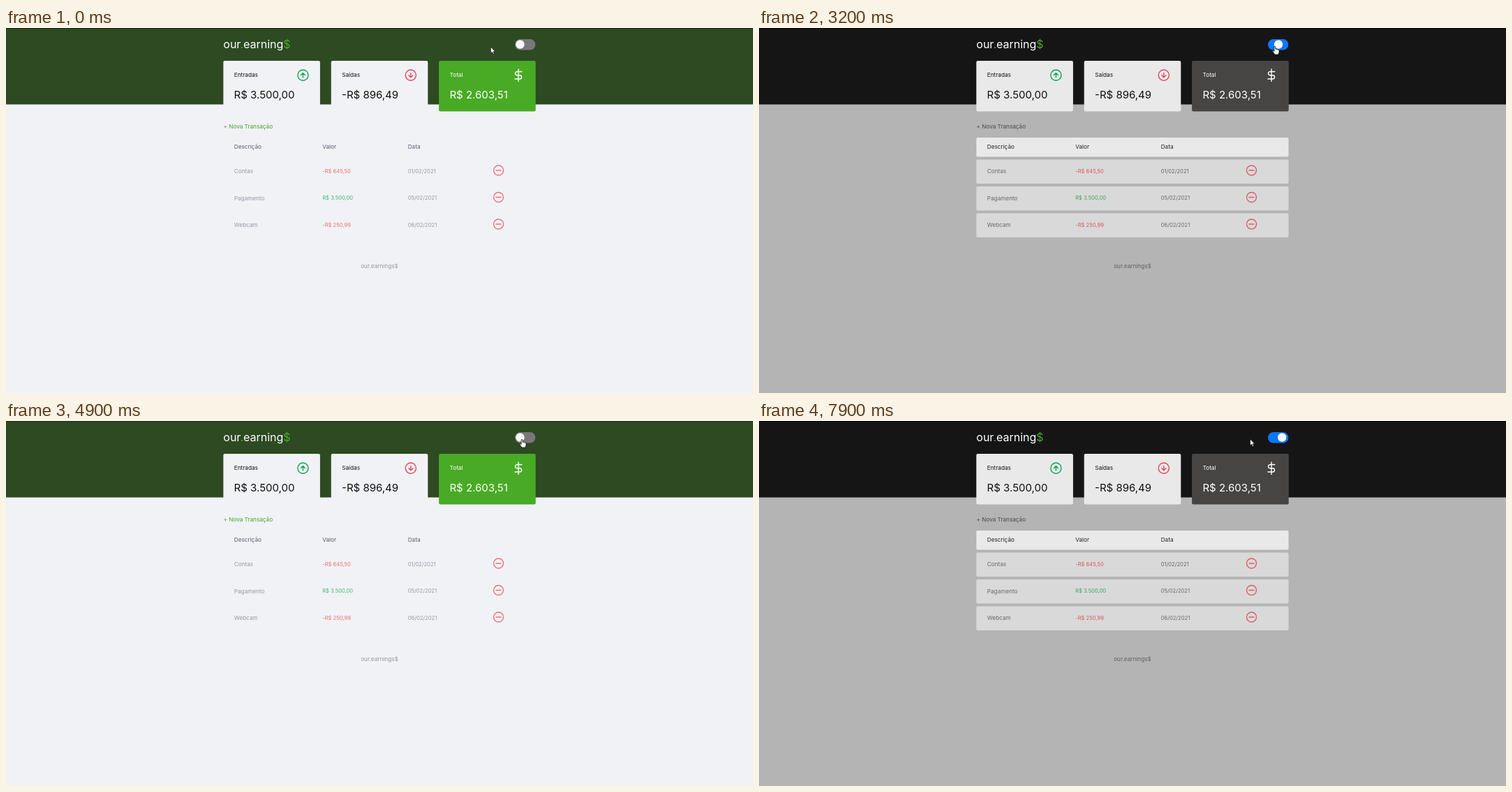
Write an HTML page that moves like this. It is 1070 px wide and 523 px high and loops after 8000 ms.

```html
<!DOCTYPE html>
<html lang="pt">
<head>
<meta charset="utf-8">
<style>
  html, body { margin: 0; width: 100%; height: 100%; overflow: hidden; }
  svg {
    --bg: #f0f2f5; --head: #2d4a22; --edge: #192a13; --card: #f0f2f5; --total: #49aa26;
    --row: #f0f2f5; --link: #49a02c; --th: #5a5d72; --cell: #9799a6; --foot: #95979f;
    --red: #f0706f; --green: #46b77a; --minus: #ee727b; --track: #7a7779;
    display: block; font: 8.2px Inter, "Open Sans", sans-serif;
  }
  svg.dark {
    --bg: #b4b4b4; --head: #161515; --edge: #050505; --card: #e9e9e9; --total: #464544;
    --row: #d9d9d9; --link: #494949; --th: #242424; --cell: #686868; --foot: #5f5f5f;
    --red: #dd565c; --green: #3aa565; --minus: #dc5f68; --track: #0a77ff;
  }
  .big { font-size: 15px; }
  .num { font-size: 7.6px; }
  .line { fill: none; stroke-width: 1.4; stroke-linecap: round; stroke-linejoin: round; }
</style>
</head>
<body>
<svg id="stage" width="1070" height="523" viewBox="0 0 1070 523">
  <rect width="1070" height="523" fill="var(--bg)"/>
  <rect width="1070" height="109.5" fill="var(--head)"/>
  <rect width="1070" height="1" fill="var(--edge)"/>
  <text x="311.3" y="29.4" font-size="16" fill="#fff">our<tspan fill="#49aa26">.</tspan>earning<tspan fill="#49aa26">$</tspan></text>
  <rect x="729" y="16" width="29.3" height="15.4" rx="7.7" fill="var(--track)"/>
  <circle id="knob" cy="23.5" r="6.2" fill="#fdf8fc"/>
  <g id="cards"></g>
  <g class="line">
    <g stroke="#12a454"><circle cx="425.4" cy="67.6" r="7.6"/><path d="M425.4 70.8v-6.4m-3 3l3-3l3 3"/></g>
    <g stroke="#e5485b"><circle cx="579.8" cy="67.6" r="7.6"/><path d="M579.8 64.4v6.4m-3-3l3 3l3-3"/></g>
    <path stroke="#fff" d="M734 59v17.4M738.8 62.5h-6.7a2.6 2.6 0 0 0 0 5.2h3.8a2.65 2.65 0 0 1 0 5.3h-6.9"/>
  </g>
  <text x="311.5" y="143.8" fill="var(--link)">+ Nova Transação</text>
  <g id="table"></g>
  <text x="535" y="343.8" text-anchor="middle" fill="var(--foot)">our.earnings$</text>
  <path id="arrow" fill="#fff" stroke="#111" stroke-width=".7" d="M0 0v9.2l2.1-1.9l1.5 3.3l1.5-.7l-1.5-3.1h2.9z"/>
  <path id="hand" fill="#fff" stroke="#111" stroke-width=".8" stroke-linejoin="round"
    d="M-1 1q1-1.4 2 0v3.3q1.2-.6 1.7.4q1.2-.5 1.7.5q1.6-.3 1.6 1.2v2.4l-1.1 3.2h-5l-3-4.3q-.6-1.5.7-1.5l1.4 1.2z"/>
</svg>
<script>
const $ = id => document.getElementById(id);
const stage = $('stage'), knob = $('knob'), arrow = $('arrow'), hand = $('hand');

const text = (x, y, str, fill, cls = '') =>
  `<text x="${x}" y="${y}" fill="${fill}" class="${cls}">${str}</text>`;
const box = (x, y, w, h, fill) =>
  `<rect x="${x}" y="${y}" width="${w}" height="${h}" rx="2" fill="var(--${fill})"/>`;

$('cards').innerHTML = [
  ['Entradas', 'R$ 3.500,00', 'card', '#111'],
  ['Saídas', '-R$ 896,49', 'card', '#111'],
  ['Total', 'R$ 2.603,51', 'total', '#fff'],
].map(([label, value, bg, ink], i) => {
  const x = 311.3 + i * 154.4;
  return box(x, 47, 138.6, 72.6, bg) + text(x + 15.5, 70.4, label, ink) +
    text(x + 15.3, 101.3, value, ink, 'big');
}).join('');

const cols = [326.8, 453.2, 575.7];
$('table').innerHTML = box(311.3, 157, 447.2, 27.5, 'card') +
  ['Descrição', 'Valor', 'Data'].map((s, i) => text(cols[i], 173.4, s, 'var(--th)')).join('') +
  [
    ['Contas', '-R$ 645,50', '01/02/2021', 'red'],
    ['Pagamento', 'R$ 3.500,00', '05/02/2021', 'green'],
    ['Webcam', '-R$ 250,99', '06/02/2021', 'red'],
  ].map(([name, value, date, hue], i) => {
    const y = 188.4 + i * 38.5;
    return box(311.3, y, 447.2, 34.6, 'row') +
      text(cols[0], y + 19.7, name, 'var(--cell)') +
      text(cols[1], y + 19.4, value, `var(--${hue})`, 'num') +
      text(cols[2], y + 19.4, date, 'var(--cell)', 'num') +
      `<g class="line" stroke="var(--minus)"><circle cx="705.5" cy="${y + 15.6}" r="7"/>` +
      `<path d="M702 ${y + 15.6}h7"/></g>`;
  }).join('');

const clamp = v => Math.min(1, Math.max(0, v));
const slide = (t, start) => 1 - (1 - clamp((t - start) / 315)) ** 2;
const smooth = v => v * v * (3 - 2 * v);

function pointer(t) {
  const enter = smooth(clamp((t - 1200) / 800));
  const leave = clamp((t - 7600) / 300);
  return t < 7600
    ? [694.3 + 44.7 * enter, 27 - enter]
    : [739 - 35.4 * leave, 26];
}

function draw(now) {
  const t = Math.floor(now % 8000 / 100) * 100;
  stage.classList.toggle('dark', t >= 3200 && t < 4700 || t >= 6400);

  const on = slide(t, 3085) - slide(t, 4585) + slide(t, 6375);
  knob.setAttribute('cx', 736.4 + 12.8 * on);

  const [x, y] = pointer(t), over = x >= 729;
  for (const [el, show] of [[arrow, !over], [hand, over]]) {
    el.setAttribute('transform', `translate(${x} ${y})`);
    el.setAttribute('visibility', show ? 'visible' : 'hidden');
  }
}

const began = performance.now();
function loop() {
  draw(performance.now() - began);
  requestAnimationFrame(loop);
}
loop();
</script>
</body>
</html>
```
